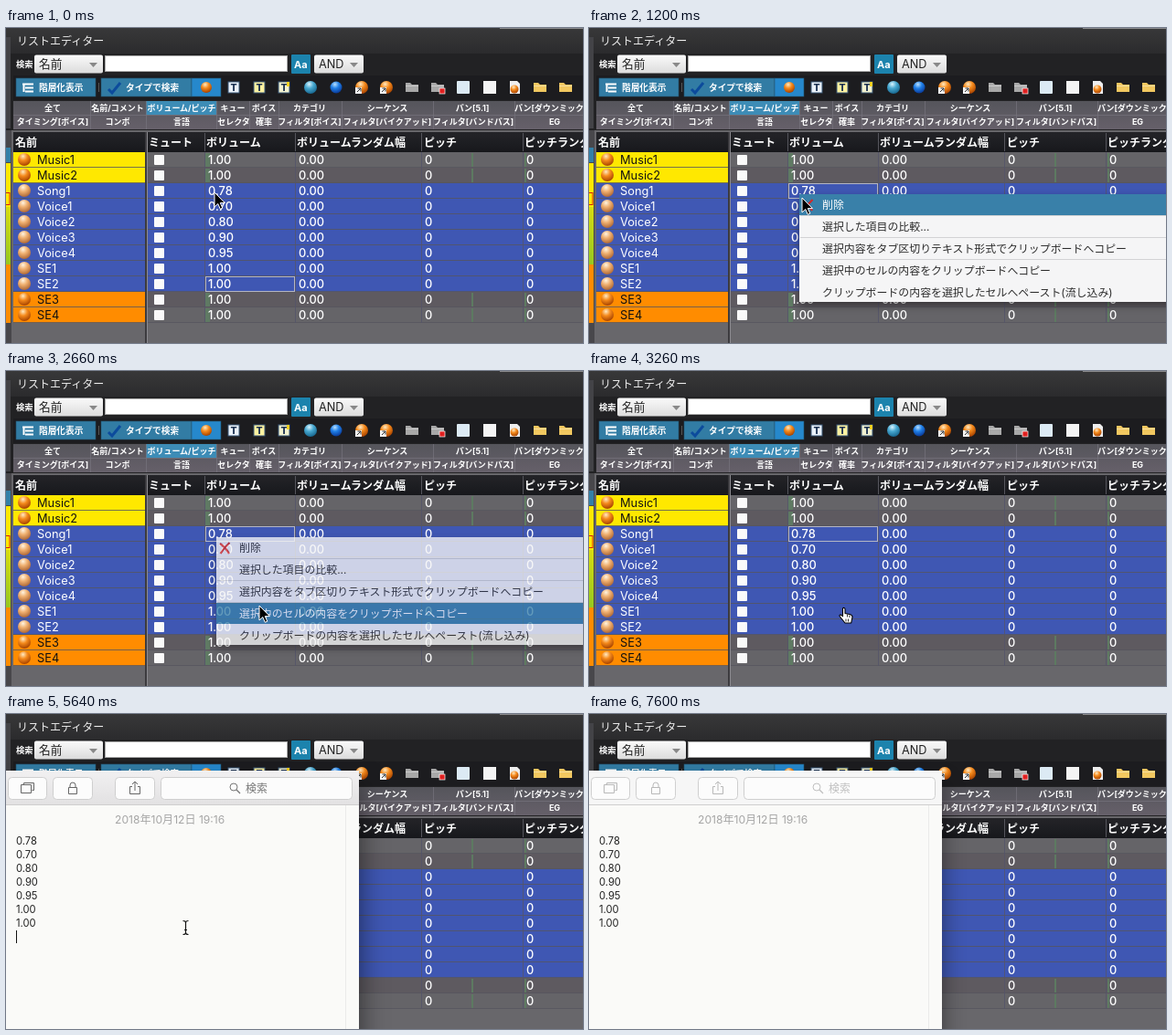
An HTML page for the animation above (7.7 s loop, 631 by 345 pixels).

```html
<!DOCTYPE html>
<html lang="ja">
<head>
<meta charset="utf-8">
<title>List editor: copy cells to a note</title>
<style>
html, body { margin: 0; width: 100%; height: 100%; overflow: hidden; background: #222; }
svg { display: block; font-family: Inter, "Noto Sans CJK JP", "Noto Sans CJK", sans-serif; }
text { white-space: pre; }
</style>
</head>
<body>
<svg id="stage" width="631" height="345" viewBox="0 0 631 345"></svg>
<script>
const LOOP = 7700;
const stage = document.getElementById('stage');

const rect = (x, y, w, h, fill, more = '') =>
  `<rect x="${x}" y="${y}" width="${w}" height="${h}" fill="${fill}" ${more}/>`;
const path = (d, fill, more = '') => `<path d="${d}" fill="${fill}" ${more}/>`;
const line = (d, color, width = 1) => path(d, 'none', `stroke="${color}" stroke-width="${width}"`);
const text = (x, y, s, size, fill = '#fff', more = '') =>
  `<text x="${x}" y="${y}" font-size="${size}" fill="${fill}" ${more}>${s}</text>`;
const bold = (x, y, s, size, more = '') => text(x, y, s, size, '#fff', `font-weight="700" ${more}`);
const ball = (x, y, r = 6, kind = 'orange') => `<circle cx="${x}" cy="${y}" r="${r}" fill="url(#${kind})"/>`;
const group = (id, body, more = '') => `<g id="${id}" ${more}>${body}</g>`;

const radial = (id, a, b, c) =>
  `<radialGradient id="${id}" cx=".4" cy=".25" r=".75"><stop stop-color="${a}"/>` +
  `<stop offset=".45" stop-color="${b}"/><stop offset="1" stop-color="${c}"/></radialGradient>`;
const vertical = (id, a, b) =>
  `<linearGradient id="${id}" x2="0" y2="1"><stop stop-color="${a}"/><stop offset="1" stop-color="${b}"/></linearGradient>`;

const defs = '<defs>' +
  radial('orange', '#ffe9c0', '#f58a1c', '#a84400') +
  radial('pale', '#fff4e0', '#f0b070', '#b06a38') +
  radial('blue', '#b8e0ff', '#2080e8', '#0a3a98') +
  radial('cyan', '#d8f4ff', '#48a8d0', '#186890') +
  vertical('title', '#383839', '#2b2b2d') + vertical('control', '#fafafa', '#dcdcdc') +
  vertical('tabs', '#55555b', '#66606a') + vertical('head', '#242428', '#17181c') +
  vertical('bar', '#f1f0f1', '#e2e1e2') + vertical('lime', '#d8dc10', '#96c820') + '</defs>';

// Window chrome and search row
function chrome() {
  const drop = (x, w, label) => rect(x, 29.5, w, 20, 'url(#control)', 'rx="2"') +
    text(x + 5, 44, label, 12.7, '#222') + path(`M${x + w - 15} 38h9l-4.5 5z`, '#888');
  return rect(0, 0, 631, 345, '#222224') + rect(0, 0, 631, 28, 'url(#title)') +
    rect(540, 0, 91, 1, '#8a8a8c') + text(12, 19, 'リストエディター', 12, '#eee') +
    rect(0, 10, 5, 100, '#434347') +
    bold(11, 43, '検索', 9.3) + drop(31, 75, '名前') +
    rect(108.5, 30.5, 199, 17, '#fff', 'stroke="#aaa"') +
    rect(312, 29, 21, 21, '#1c83ad', 'rx="1"') + bold(315, 43.5, 'Aa', 11) + drop(337, 54, 'AND');
}

function toolbar() {
  const button = (x, w, fill) => rect(x, 55, w, 20, fill, 'stroke="#245570" stroke-width=".6"');
  const letter = (x, fill) => rect(x - 6, 59, 12, 12, fill, 'stroke="#3a5878"') +
    text(x, 69, 'T', 10.5, '#1a3050', 'text-anchor="middle" font-weight="800"');
  const folder = (x, fill) => path(`M${x - 7} 60h5l2 2h7v8h-14z`, fill) + rect(x - 7, 63, 14, 1, '#fff6');
  const link = x => ball(x, 65, 7) + rect(x - 7, 65, 7, 7, '#f4f4f4') + line(`M${x - 5} 70l4-4h-3.5M${x - 1} 66v3.5`, '#333');
  return rect(8, 52, 623, 27, '#1c1c1f') +
    button(11, 87, '#327ca4') + line('M18 61.5h12M21 65.5h9M21 69.5h9M19.5 62v8', '#fff', 2) +
    bold(36, 69, '階層化表示', 9.7) + rect(101, 60, 1, 10, '#555') +
    button(104, 99, '#327ca4') + line('M112 67l4 4L125 60', '#0c4b9c', 3) +
    bold(131, 69, 'タイプで検索', 9.7) +
    button(203, 32, '#2688cc') + ball(219, 65) +
    letter(249, '#eaf2fa') + letter(277, '#fff3a0') + letter(304, '#f2f2d0') + rect(307, 59, 3, 5, '#f4d020') +
    ball(333, 65, 7, 'cyan') + ball(361, 65, 6.5, 'blue') + link(389) + link(416) +
    folder(444, '#a8a8a8') + folder(472, '#a8a8a8') + rect(474, 66, 6, 6, '#e02020', 'stroke="#fff" stroke-width=".7"') +
    rect(493, 58, 14, 14, '#dceaf4', 'rx="1"') + rect(522, 58, 14, 14, '#f4f4f4') +
    path('M551 58h8l3 3v11h-11z', '#eee') + ball(556, 67, 4.5) +
    folder(584, '#f2c860') + folder(612, '#f2c860');
}

function tabs() {
  const top = [[51, '全て'], [122, '名前/コメント'], [192, 'ボリューム/ピッチ'], [248, 'キュー'], [282, 'ボイス'],
    [332, 'カテゴリ'], [417, 'シーケンス'], [510, 'パン[5.1]'], [600, 'パン[ダウンミックス]']];
  const low = [[51, 'タイミング[ボイス]'], [122, 'コンボ'], [192, '言語'], [249, 'セレクタ'], [282, '確率'],
    [332, 'フィルタ[ボイス]'], [417, 'フィルタ[バイクアッド]'], [511, 'フィルタ[バンドパス]'], [600, 'EG']];
  const row = (list, y) => list.map(([x, s]) => bold(x, y, s, 9, 'text-anchor="middle"')).join('');
  const edges = [92, 153, 230, 266, 298, 367, 467, 556];
  return rect(8, 80, 623, 31, 'url(#tabs)') + rect(153, 80, 77, 15, '#3d8cb6') +
    line('M8 95.5H631' + edges.map(x => `M${x + .5} 80v31`).join(''), '#77757e', .7) +
    row(top, 91) + row(low, 106);
}

function table() {
  const names = 'Music1 Music2 Song1 Voice1 Voice2 Voice3 Voice4 SE1 SE2 SE3 SE4'.split(' ');
  const volumes = '1.00 1.00 0.78 0.70 0.80 0.90 0.95 1.00 1.00 1.00 1.00'.split(' ');
  let out = rect(6, 112, 625, 233, '#68676b') + rect(8, 114, 623, 22, 'url(#head)') +
    [[10, '名前'], [156, 'ミュート'], [219, 'ボリューム'], [318, 'ボリュームランダム幅'], [457, 'ピッチ'], [567, 'ピッチランダム幅']]
      .map(([x, s]) => bold(x, 130, s, 12)).join('') +
    line('M217.5 115v20M316.5 115v20M454.5 115v20M565.5 115v20', '#55555c');
  names.forEach((name, i) => {
    const y = 136 + i * 17, picked = i > 1 && i < 9;
    const tint = i < 2 ? '#ffe800' : picked ? '#4058b4' : '#ff8c00';
    out += rect(8, y, 144, 16.5, tint) + ball(20, y + 8, 7, picked ? 'pale' : 'orange') +
      text(34, y + 13, name, 12.8, picked ? '#fff' : '#111') +
      rect(155, y, 476, 16.5, picked ? '#3f57b3' : i % 2 ? '#5e5a60' : '#656468') +
      rect(162, y + 3, 11, 11, '#fafafa', 'rx="1"');
    if (!picked) out += rect(218, y + 1, 5, 15, '#5f7a63') + rect(509, y + 1, 2, 15, '#5d7a61') + rect(567, y + 1, 2, 15, '#5d7a61');
    [[221, volumes[i]], [320, '0.00'], [458, '0'], [569, '0']]
      .forEach(([x, s]) => out += text(x, y + 13, s, 12.8, '#fff', 'font-weight="500"'));
    out += rect(8, y + 16.4, 623, .6, '#50505a');
  });
  return out + line('M217.5 136v187M316.5 136v187M454.5 136v187M565.5 136v187', '#55556a', .8) +
    rect(152, 114, 2, 231, '#3c3b3f') + rect(154, 114, 1, 231, '#8c8b90') +
    rect(0, 112, 6, 233, '#48474b') + rect(0, 131, 5, 16, '#3380a8') + rect(0, 148, 5, 48, '#ffe800') +
    rect(0, 196, 5, 63, 'url(#lime)') + rect(0, 259, 5, 64, '#ff8c00') + rect(-2, 180.5, 6, 13, 'none', 'stroke="#d02010"');
}

// Context menu
const items = ['削除', '選択した項目の比較...', '選択内容をタブ区切りテキスト形式でクリップボードへコピー',
  '選択中のセルの内容をクリップボードへコピー', 'クリップボードの内容を選択したセルへペースト(流し込み)'];
const itemTop = i => 182 + i * 23.9;
const menu = rect(230, 182, 440, 118, '#f5f5f6', 'style="filter:drop-shadow(0 4px 4px #0006)"') +
  line('M231 205.5H631M231 229.5H631M231 253.5H631', '#d2d2d4') +
  rect(230, 0, 401, 23, '#3980a9', 'id="bar-lit"') +
  line('M234 189Q240 193 244 200M244.5 188Q238 194 234.5 200', '#d02a2a', 2.2) +
  items.map((s, i) => text(255, itemTop(i) + 15.9, s, 11.92, '#2c2c2c', 'class="item"')).join('');

// Notes window
const values = '0.78 0.70 0.80 0.90 0.95 1.00 1.00'.split(' ');
const key = (x, w) => rect(x, 69.5, w, 24, '#fcfcfc', 'rx="4" stroke="#cfcfcf"');
const notes = rect(-100, 62, 486, 400, '#fafaf8', 'id="pane"') +
  rect(0, 62, 386, 38, 'url(#bar)', 'id="bar-top"') + rect(0, 99, 386, 1, '#cfcece') +
  key(2.5, 42) + key(51.5, 43) + key(119.5, 43) + key(169.5, 209) +
  group('icons', line('M19.5 77.5v-2h11v8h-2M16.5 77.5h11v9h-11z', '#666') +
    line('M70 80v-2a3 3 0 0 1 6 0v2M68.5 80.5h9v7h-9z', '#666') +
    line('M138 79.5h-2.5v8h11v-8H144M141 84V74M138 77l3-3 3 3', '#666') +
    `<circle cx="249" cy="80" r="4" fill="none" stroke="#777"/>` + line('M252 83l4 4', '#777', 1.3) +
    text(262, 86, '検索', 12, '#777')) +
  line('M371.5 100V345', '#ebebea') + text(119, 120, '', 12.1, '#a5a5a5', 'id="date"') +
  group('pasted', values.map((s, i) => text(11, 143 + i * 15, s, 11.2, '#222')).join('')) +
  rect(11, 0, 1, 14, '#111', 'id="caret"');

const arrow = path('M0 0V16L3.8 12.5 6.3 18.3 8.8 17.2 6.3 11.6H11.4Z', '#000', 'stroke="#fff" stroke-width="1"');
const hand = path('M4 1.5c1-1.2 2.4-.4 2.5.8V7l5 1c2 .4 3 1.2 3 3l-1.3 6.5H6.5L2.5 12.5.6 10c-.5-1.6 1-2 2.1-1L4 10.2z',
  '#fff', 'stroke="#000" stroke-width="1.1" stroke-linejoin="round"') + line('M9 8v3M11.5 9v2.5M7.5 13v3M10 13v3', '#000', .8);
const beam = line('M-3 -7.5Q0 -7.5 0 -5.5Q0 -7.5 3 -7.5M0 -6V6M-3 7.5Q0 7.5 0 5.5Q0 7.5 3 7.5M-1.5 2.5h3', '#111', 1.2);

stage.innerHTML = defs + chrome() + toolbar() + tabs() + table() +
  rect(218.5, 0, 97, 16, 'none', 'id="focus" stroke="#b4b6c4"') +
  group('menu', menu) + group('notes', notes) +
  group('arrow', arrow) + group('hand', hand) + group('beam', beam);

const $ = id => document.getElementById(id);
const show = (id, on) => $(id).style.display = on ? '' : 'none';
const put = (id, x, y) => $(id).setAttribute('transform', `translate(${x} ${y})`);
// Last entry whose start time has passed
const at = (steps, t) => steps.filter(s => s[0] <= t).pop();

// [start, x, y]
const arrowSteps = [[0, 228, 180], [1200, 233, 186], [1340, 250, 209], [1490, 266, 235],
  [1640, 272, 245], [1780, 273, 247], [1930, 276, 255], [2070, 277, 257]];
const beamSteps = [[0, 278, 259], [4600, 247.5, 253], [4750, 196.5, 234]];
const litSteps = [[0, -1], [1200, 0], [1340, 1], [1490, 2], [1930, 3]];
const caretSteps = [[0, 1], [4600, 0], [5190, 1], [6090, 0], [6680, 1], [7270, 0]];

function draw(t) {
  $('focus').setAttribute('y', t < 300 ? 272.5 : 170.5);

  const lit = at(litSteps, t)[1];
  show('menu', t >= 300 && t < 2810);
  $('menu').style.opacity = t < 2660 ? 1 : .78;
  show('bar-lit', lit >= 0);
  $('bar-lit').setAttribute('y', Math.round(itemTop(lit)));
  document.querySelectorAll('.item').forEach((e, i) => e.setAttribute('fill', i === lit ? '#fff' : '#2c2c2c'));

  const pasted = t >= 5640, idle = t >= 7600;
  show('notes', t >= 4150);
  show('pasted', pasted);
  show('caret', at(caretSteps, t)[1]);
  $('caret').setAttribute('y', pasted ? 237 : 132);
  $('date').textContent = '2018年10月12日 19:1' + (pasted ? 6 : 5);
  $('bar-top').setAttribute('fill', idle ? '#f6f6f6' : 'url(#bar)');
  $('icons').style.opacity = idle ? .45 : 1;
  $('pane').style.filter = `drop-shadow(0 ${idle ? 14 : 19}px ${idle ? 12 : 15}px rgba(0,0,0,${idle ? .45 : .55}))`;

  show('arrow', t < 3260);
  show('hand', t >= 3260 && t < 4300);
  show('beam', t >= 4300 && t < 6830);
  put('arrow', ...at(arrowSteps, t).slice(1));
  put('hand', 273.5, 258.5);
  put('beam', ...at(beamSteps, t).slice(1));
}

const start = performance.now();
function tick() {
  draw((performance.now() - start) % LOOP);
  requestAnimationFrame(tick);
}
tick();
</script>
</body>
</html>
```
